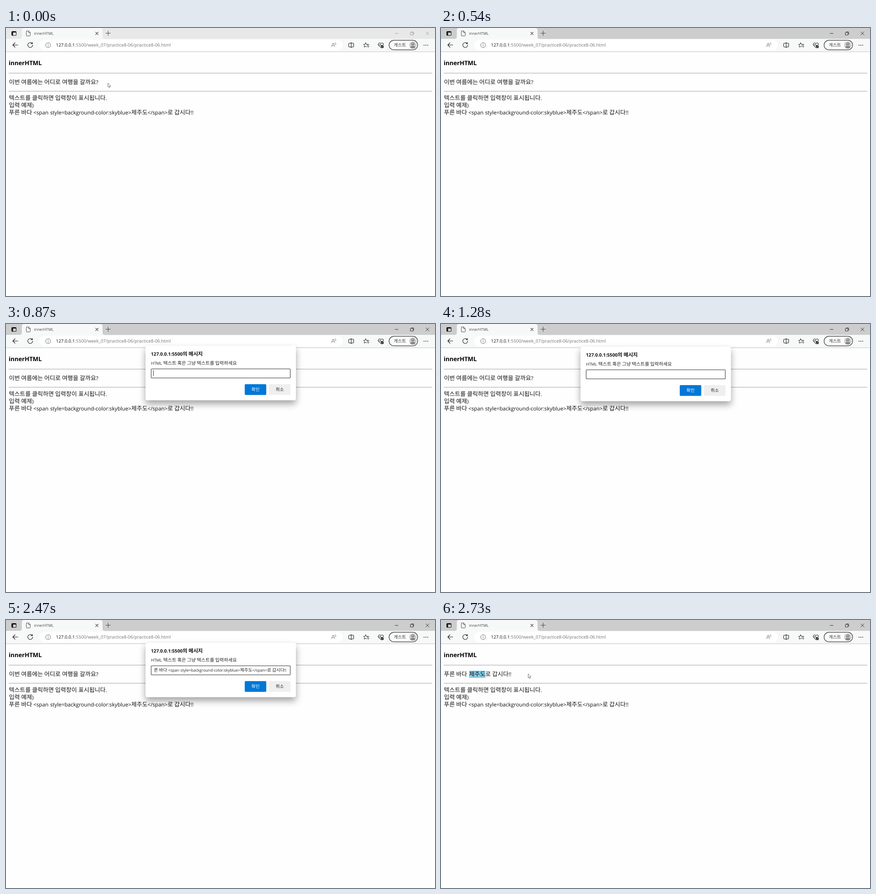
An HTML page with a canvas for the animation above (5340 ms loop, 947 px wide and 592 px high).

```html
<!DOCTYPE html>
<html lang="ko">
<head>
<meta charset="utf-8">
<title>innerHTML</title>
<style>
html, body { margin: 0; width: 100%; height: 100%; overflow: hidden; background: #fefefe; }
canvas { display: block; }
</style>
</head>
<body>
<canvas id="stage" width="947" height="592"></canvas>
<script>
const W = 947, H = 592, LOOP = 5340;
const LATIN = '"Open Sans", "Noto Sans", sans-serif';
const HANGUL = '"Noto Sans CJK KR", "Noto Sans CJK", sans-serif';
const INK = '#1b1b1b';

const stage = document.getElementById('stage').getContext('2d');
const layer = document.createElement('canvas');
layer.width = W;
layer.height = H;
const overlay = layer.getContext('2d');
let g = stage;

// Unrounded glyph advances
for (const c of [stage, overlay]) c.textRendering = 'geometricPrecision';

// Times (ms) at which a state begins
const CURSOR = [[0, [225, 122]], [70, [224, 122]], [130, [220, 121]], [200, [214, 121]],
  [270, [208, 120]], [330, null], [2600, [192.5, 119.5]]];
const DIALOG = [[0, null], [670, { dy: -10, alpha: .3 }], [740, { dy: -6, alpha: .7 }],
  [800, { dy: -4, alpha: .95 }], [870, { dy: -2, alpha: 1 }], [930, { dy: 0, alpha: 1 }],
  [2530, { dy: -2, alpha: .96, scale: 1.002 }], [2600, { dy: -6, alpha: .78, scale: 1.007 }],
  [2670, { dy: -9, alpha: .3, scale: 1.012 }], [2730, null]];
const CARET = [[0, true], [1280, false], [1810, true], [2470, false]];
const ACTIVE = 540, PASTE = 1940, BLUR = 2530, RESULT = 2600;

function at(keys, t) {
  let value;
  for (const [start, v] of keys) if (t >= start) value = v;
  return value;
}

// Mixed Latin and Hangul text; returns the end x
function text(s, x, y, size, hangul, color = INK, weight = 400) {
  g.fillStyle = color;
  g.wordSpacing = size * .06 + 'px';
  for (const run of s.match(/[가-힣]+|[^가-힣]+/g)) {
    const korean = /[가-힣]/.test(run);
    g.font = `${weight} ${korean ? hangul : size}px ${korean ? HANGUL : LATIN}`;
    g.fillText(run, x, y);
    x += g.measureText(run).width;
  }
  return x;
}

function rect(x, y, w, h, color) {
  g.fillStyle = color;
  g.fillRect(x, y, w, h);
}

function round(x, y, w, h, r, fill, stroke, width = 1) {
  g.beginPath();
  g.roundRect(x, y, w, h, r);
  if (fill) { g.fillStyle = fill; g.fill(); }
  if (stroke) { g.strokeStyle = stroke; g.lineWidth = width; g.stroke(); }
}

function path(d, color = INK, width = 1) {
  g.strokeStyle = color;
  g.lineWidth = width;
  g.lineCap = g.lineJoin = 'round';
  g.stroke(new Path2D(d));
}

function shape(d, color) {
  g.fillStyle = color;
  g.fill(new Path2D(d));
}

function disc(x, y, r, color) {
  g.fillStyle = color;
  g.beginPath();
  g.arc(x, y, r, 0, 7);
  g.fill();
}

function star(cx, cy, r) {
  let d = '';
  for (let i = 0; i < 10; i++) {
    const a = i * Math.PI / 5 - Math.PI / 2, k = i % 2 ? r * .48 : r;
    d += `${i ? 'L' : 'M'}${cx + k * Math.cos(a)} ${cy + k * Math.sin(a)}`;
  }
  return d + 'Z';
}

function tabBar(active) {
  rect(0, 0, W, 24, active ? '#cdcdcd' : '#e8e8e8');
  shape('M30 24Q35 24 35 19V5Q35 0 40 0H208Q213 0 213 5V19Q213 24 218 24Z', '#f7f9f8');

  round(12.5, 7.5, 10, 9, 1.8, null, INK, 1.1);
  rect(13, 8, 9, 2, INK);
  rect(13, 8, 2.6, 8, INK);

  path('M45.5 6.5H50L53.5 10V16.5Q53.5 17.5 52.5 17.5H46Q45 17.5 45 16.5V7Q45 6.5 45.5 6.5M49.8 6.7V10.2H53.3', '#444');
  text('innerHTML', 62, 15, 8.35, 9, '#444');
  path('M198 9.2L203.6 14.8M203.6 9.2L198 14.8', '#333', 1.1);
  path('M220.5 11.5H230.5M225.5 6.5V16.5', '#444');

  const tone = active ? '#222' : '#999';
  path('M858.7 12H865.7', tone, .9);
  path('M893 10H898.5V15.5H893ZM894.5 8.5H899Q900 8.5 900 9.5V14', tone, .9);
  path('M926.7 8.2L934 15.5M934 8.2L926.7 15.5', tone, .9);
}

function toolbar() {
  rect(0, 24, W, 28, '#f7f9f8');
  rect(0, 52, W, 1, '#c4c4c4');
  round(74, 26, 669, 23, 11.5, '#fff');

  path('M15 37.5H26M20 32.5L15 37.5L20 42.5', INK, 1.15);
  path('M57.7 34.2A5.4 5.4 0 1 0 58.9 37.7M58.4 31.8V34.7H55.3', INK, 1.15);
  path('M87.6 38A5.4 5.4 0 1 0 98.4 38A5.4 5.4 0 1 0 87.6 38M93 37.4V40.6', '#707070');
  disc(93, 35.3, .75, '#707070');

  const x = text('127.0.0.1', 110.3, 41.3, 9.85, 10, '#111');
  text(':5500/week_07/practice8-06/practice8-06.html', x, 41.3, 9.85, 10, '#737373');

  path('M718.3 41.5L722 33L725.7 41.5M719.5 38.8H724.5', '#777', .95);
  path('M725.5 33.3Q726.8 34.8 725.9 36.6M727.3 32.3Q729.5 34.8 728 37.4', '#777', .8);

  round(756.5, 33.5, 11, 8.5, 1.8, null, INK, 1.05);
  path('M762 32V43.5', INK, 1.1);

  path(star(794, 38, 5.3), INK, .95);
  rect(796, 36.5, 6, 6.5, '#f7f9f8');
  path('M796.4 36.4H801M796.8 39H801M798 41.6H801', INK, 1);

  path('M827.5 43.5L823 39Q820.7 36 822.7 33.8Q825.2 31.8 827.5 34.5Q829.8 31.8 832.3 33.8Q833.7 35.5 832.8 37.5', INK, 1.05);
  path('M822.3 37.8H825L826.2 35.7L828 39.7L829 37.8H830', INK, .9);
  disc(830.7, 41.3, 3.1, INK);
  path('M829.3 41.4L830.4 42.4L832.2 40.4', '#fff', .8);

  round(845.6, 27.1, 63, 21.2, 10.6, '#fafbfb', '#333', 1.2);
  text('게스트', 856, 41, 9, 9.8, '#333');
  disc(898, 37.7, 8, '#cfcdcc');
  disc(898, 35.2, 3.5, '#8a8886');
  shape('M892.5 43.5Q892.5 39.8 896 39.8H900Q903.5 39.8 903.5 43.5Q898 47 892.5 43.5Z', '#8a8886');
  path('M897 34.3Q897.2 33.2 898.2 33.3Q899.4 33.7 898.7 34.8L898 35.7M898 37.2V37.3', '#eee', .8);

  for (let i = 0; i < 3; i++) disc(922.8 + i * 4, 38, .95, INK);
}

function rule(y) {
  rect(6, y, 935, 1, '#b0b0b0');
  rect(6, y + 1, 935, 1, '#ececec');
}

function page(done) {
  rect(0, 53, W, H - 53, '#fefefe');
  text('innerHTML', 6, 81.7, 13.25, 14, '#000', 700);
  rule(99);
  rule(139);

  const line = (s, y, x = 6.5) => text(s, x, y, 11.7, 13.05, '#111');
  if (done) {
    rect(62, 112, 36, 16, '#87ceeb');
    line('푸른 바다 ', 124.4);
    line('제주도로 갑시다!!', 124.4, 62);
  } else {
    line('이번 여름에는 어디로 여행을 갈까요?', 124.4);
  }
  line('텍스트를 클릭하면 입력창이 표시됩니다.', 158.9);
  line('입력 예제)', 174.9);
  line('푸른 바다 <span style=background-color:skyblue>제주도</span>로 갑시다!!', 190.9);
}

function button(x, label, fill, color) {
  round(x, 135, 47.5, 23.7, 2, fill);
  text(label, x + 14.7, 149.6, 9, 9.8, color);
}

function dialog(t) {
  g.clearRect(0, 0, W, H);
  g.save();
  g.shadowColor = 'rgba(0,0,0,.36)';
  g.shadowBlur = 15;
  g.shadowOffsetY = 8;
  round(308, 50, 332, 120.5, 4, '#fff');
  g.restore();

  text('127.0.0.1:5500의 메시지', 320, 71.8, 10.2, 11.4, '#111', 700);
  text('HTML 텍스트 혹은 그냥 텍스트를 입력하세요', 320, 92.4, 9, 10.4, '#222');

  if (t < BLUR) round(320.5, 101.2, 307, 20, 1, '#fff', '#707070', 1.6);
  else round(320, 101, 307.5, 20, 1, '#fff', '#cfcfcf', 1);

  const pasted = t >= PASTE;
  if (pasted) text('른 바다 <span style=background-color:skyblue>제주도</span>로 갑시다!!', 326.5, 114.2, 8.6, 9.8, '#222');
  if (at(CARET, t)) rect(pasted ? 621 : 325, 104, 1, 13, '#333');

  button(527, '확인', '#0078d7', '#fff');
  button(580.5, '취소', '#efefef', '#222');
}

function cursor([x, y]) {
  g.save();
  g.translate(x, y);
  const arrow = 'M0 0V8.4L1.9 6.7L3.3 9.8L4.7 9.2L3.4 6.2H5.9Z';
  shape(arrow, '#fff');
  path(arrow, '#555', .8);
  g.restore();
}

function draw(t) {
  g = stage;
  page(t >= RESULT);
  tabBar(t >= ACTIVE);
  toolbar();

  const pose = at(DIALOG, t);
  if (pose) {
    g = overlay;
    dialog(t);
    g = stage;
    const k = pose.scale || 1, cx = 474, cy = 110;
    g.globalAlpha = pose.alpha;
    g.drawImage(layer, cx * (1 - k), cy * (1 - k) + pose.dy, W * k, H * k);
    g.globalAlpha = 1;
  }

  const tip = at(CURSOR, t);
  if (tip) cursor(tip);
}

const begin = performance.now();
function tick() {
  draw((performance.now() - begin) % LOOP);
  requestAnimationFrame(tick);
}
tick();
</script>
</body>
</html>
```
